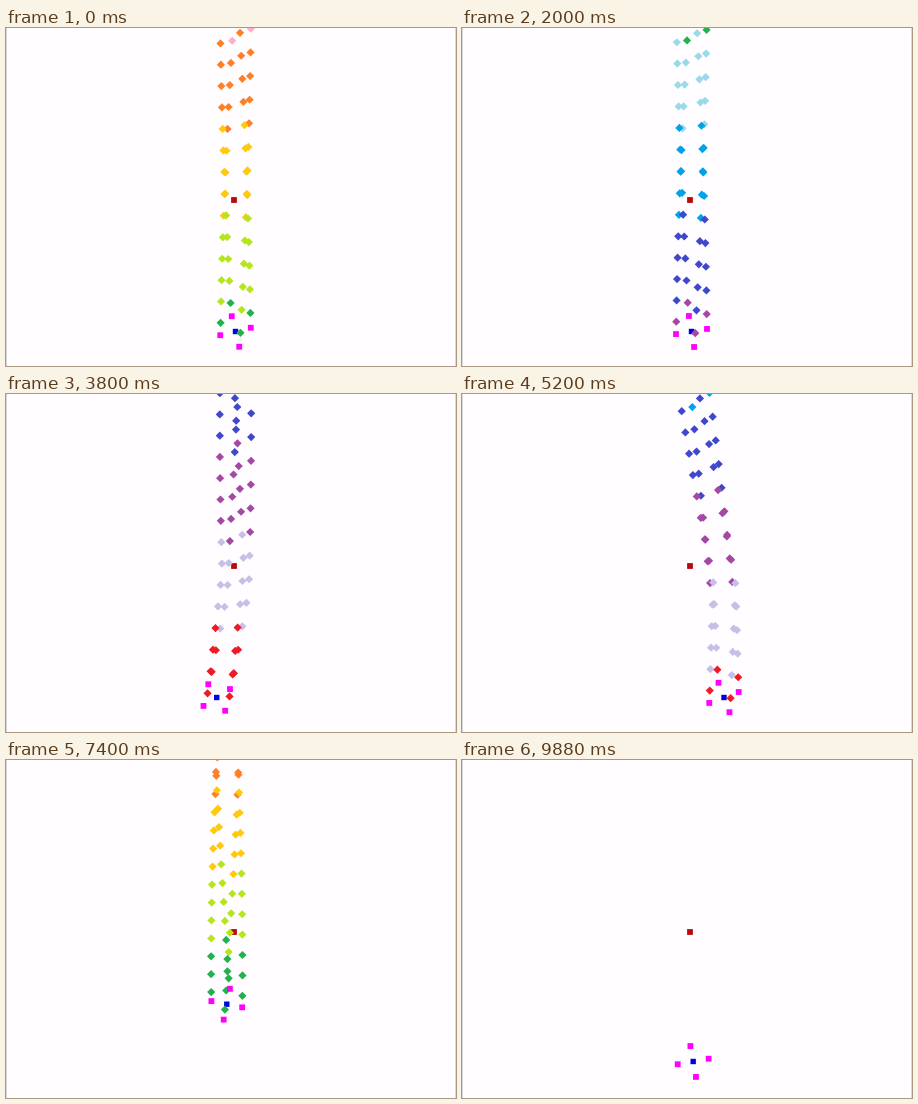
Write an HTML page with a canvas that moves like this. It is 450 px wide and 338 px high and loops after 9.92 s.

```html
<!DOCTYPE html>
<html>
<head>
<meta charset="utf-8">
<style>
  html, body { margin: 0; width: 100%; height: 100%; overflow: hidden; background: #fffdff; }
  canvas { display: block; }
</style>
</head>
<body>
<canvas id="stage" width="450" height="338"></canvas>
<script>
const ctx = document.getElementById('stage').getContext('2d');
const LOOP = 9920, TICK = 40, LAST = LOOP / TICK - 1;
const SPEED = 3.35;       // hub travel per step while a key is held
const RADIUS = 15.7;      // hub to corner
const SPIN = 4.573;       // degrees per step
const SCROLL = 22.5;      // upward drift of the trail per step
const FIRST_GAP = 13.6;   // drift of the newest trail marks
const COLORS = ('#22b14c #99d9ea #00a2e8 #3f48cc #a349a4 #c8bfe7 ' +
                '#ed1c24 #ffaec9 #ff7f27 #ffc90e #b5e61d').split(' ');

// Key presses as [first step, signed number of steps held]
const steerX = [[108.4, -12.3], [129, 22], [161.5, -14.4], [185, 2.1], [228, 4.9],
                [234.9, -6], [242, 3.8], [249.7, 3.1], [252.8, -2.7]];
const steerY = [[204.3, -18.7], [226, 18.1]];

const travel = (presses, step) => presses.reduce((sum, [from, hold]) =>
  sum + SPEED * Math.sign(hold) * Math.min(Math.max(step - from, 0), Math.abs(hold)), 0);
const hubX = step => 229.5 + travel(steerX, step);
const hubY = step => 303.5 + travel(steerY, step);

function square(x, y, size, color) {
  ctx.fillStyle = color;
  ctx.fillRect(x - size / 2, y - size / 2, size, size);
}

function diamond(x, y, color) {
  const r = 4.1;
  ctx.fillStyle = color;
  ctx.beginPath();
  ctx.moveTo(x, y - r);
  ctx.lineTo(x + r, y);
  ctx.lineTo(x, y + r);
  ctx.lineTo(x - r, y);
  ctx.fill();
}

// Calls mark(x, y) for the four corners of the spinning frame at a step
function corners(step, mark) {
  const x = hubX(step), y = hubY(step);
  const turn = (13.8 - SPIN * step) * Math.PI / 180;
  for (let i = 0; i < 4; i++) {
    const a = turn + i * Math.PI / 2;
    mark(x - RADIUS * Math.sin(a), y - RADIUS * Math.cos(a));
  }
}

function draw(now) {
  const tick = Math.floor((now % LOOP) / TICK);
  const step = Math.round(tick * 1.2);   // 30 steps per second

  ctx.fillStyle = '#fffdff';
  ctx.fillRect(0, 0, 450, 338);
  ctx.fillStyle = '#d9d8dc';
  ctx.fillRect(0, 0, 1, 338);
  ctx.fillRect(449, 0, 1, 338);

  square(hubX(step), hubY(step), 5.4, '#0000e6');
  square(228, 172, 5.8, '#b90a0a');

  // The trail is wiped on the last tick
  for (let age = 16; age >= 0 && tick < LAST; age--) {
    const color = COLORS.at(Math.floor((step - age) / 4) % COLORS.length);
    const rise = FIRST_GAP + SCROLL * age;
    corners(step - 1 - age, (x, y) => diamond(x, y - rise, color));
  }
  corners(step, (x, y) => square(x, y, 5.8, '#ff00ff'));
}

let start;
function loop(now) {
  start ??= now;
  draw(now - start);
  requestAnimationFrame(loop);
}
draw(0);
requestAnimationFrame(loop);
</script>
</body>
</html>
```
